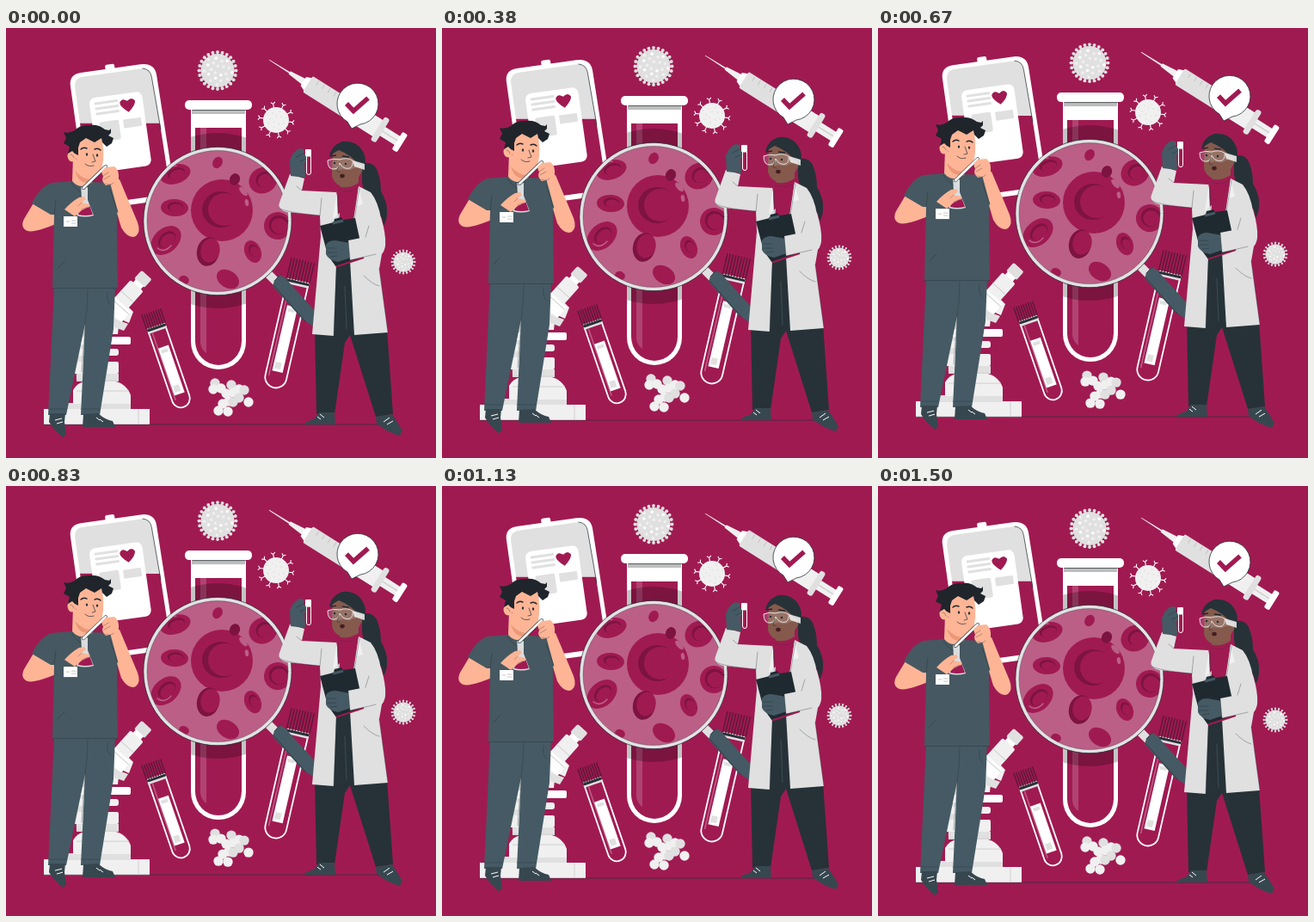
An HTML page that plays this animation: 500 px wide and 500 px high, repeating every 1.54 s.

```html
<!DOCTYPE html>
<html lang="en">
<head>
<meta charset="utf-8">
<title>Blood research</title>
<style>
  html, body { margin: 0; width: 100%; height: 100%; overflow: hidden; background: #a01a52; }
  svg { display: block; width: 100%; height: 100%; }
  .red { fill: #a01a52; }
  .deep { fill: #7c1340; }
  .pink { fill: #bb5f87; }
  .white { fill: #fff; }
  .pale { fill: #f0f0f0; }
  .grey { fill: #e0e0e0; }
  .mid { fill: #c4c4c4; }
  .ink { fill: #263238; }
  .slate { fill: #455a64; }
  .skin { fill: #fdb596; }
  .brown { fill: #855a4c; }
  .line { fill: none; stroke: #263238; stroke-width: .7; stroke-linecap: round; stroke-linejoin: round; }
  .glass { fill: none; stroke: #fff; }
</style>
</head>
<body>
<svg viewBox="0 0 500 500">
<defs>
  <clipPath id="lens"><circle cx="246" cy="224.5" r="84"/></clipPath>
  <clipPath id="shell"><path d="M215 116H279V365a32 32 0 0 1-64 0Z"/></clipPath>
</defs>
<g id="scene">
  <path class="line" d="M44 461H437"/>

  <g id="bag" transform="translate(73 54) rotate(-8)">
    <rect class="white" x="43" y="-5" width="11" height="10" rx="2"/>
    <path class="white" d="M14 0H84Q100 0 101 14L103 146Q103 160 88 160H14Q0 160 0 146V14Q0 0 14 0Z"/>
    <path class="grey" d="M16 5H82Q94 5 95 17L97 71 5 58V17Q5 5 16 5Z"/>
    <path class="red" d="M5 58 97 71 98 143Q98 154 86 154H16Q5 154 5 143Z"/>
    <path class="line" d="M86 5Q95 7 95 17L97 78"/>
    <rect class="white" x="19" y="31" width="62" height="87" rx="7"/>
    <path d="M26 38H51M26 44H51M26 50H51" stroke="#e0e0e0" stroke-width="3" stroke-linecap="round"/>
    <path class="red" d="M63 53Q54 46 54 41 57 35 63 40 69 35 72 41 72 46 63 53Z"/>
    <rect class="grey" x="27" y="60" width="23" height="23" rx="2"/>
    <rect class="grey" x="55" y="61" width="21" height="10" rx="1"/>
  </g>

  <g id="tube">
    <path class="white" d="M215 92H279V365a32 32 0 0 1-64 0Z"/>
    <path class="red" d="M220 116H274V364a27 28 0 0 1-54 0Z"/>
    <path class="pink" d="M226 116H233V378Q227 374 226 366Z" opacity=".6"/>
    <circle clip-path="url(#shell)" cx="246" cy="224" r="102" opacity=".23"/>
    <rect x="216" y="94" width="62" height="6" fill="#bdbdbd"/>
    <rect class="white" x="208" y="84" width="78" height="11" rx="5"/>
    <path class="line" d="M217 95.5H279"/>
  </g>

  <g id="syringe" transform="translate(306 37) rotate(32.2)">
    <path class="pale" d="M0-.4 30-1V1L0 .4Z"/>
    <path class="pale" d="M28-2 48-4V4L28 2Z"/>
    <path class="white" d="M47-6 54-9V9L47 6Z"/>
    <rect class="grey" x="53" y="-11" width="98" height="22" rx="2"/>
    <rect class="pale" x="104" y="-11" width="47" height="22" rx="2"/>
    <rect class="pale" x="154" y="-6" width="24" height="12"/>
    <path d="M154 0H178" stroke="#d0d0d0" stroke-width="1.5"/>
    <rect class="grey" x="149" y="-16" width="7" height="32" rx="3"/>
    <rect class="white" x="176" y="-12" width="7" height="24" rx="2"/>
    <path d="M62-10V-4M70-10V-4M78-10V-4M86-10V-4" stroke="#c4c4c4"/>
  </g>
  <path class="white" d="M397 109 402 117 412 112A24 24 0 1 0 397 109Z" stroke="#263238" stroke-width=".8"/>
  <path d="M396 88 404 96.5 421 81.5" fill="none" stroke="#a01a52" stroke-width="5.5"/>

  <g id="germs"></g>
  <g id="balls"></g>

  <g id="microscope">
    <rect class="pale" x="44" y="443" width="123" height="18"/>
    <path d="M44 460.5H167M53 443V461M154 443V461" stroke="#d0d0d0"/>
    <rect class="grey" x="62" y="436" width="83" height="7"/>
    <path class="pale" d="M78 437V421Q84 410 100 410H124Q140 413 145 427V437Z"/>
    <path class="grey" d="M80 330H118V402H131V411H82Z"/>
    <path d="M82 422H143M82 410H131" stroke="#d0d0d0"/>
    <rect class="pale" x="78" y="388" width="53" height="14" rx="2"/>
    <rect class="pale" x="78" y="373" width="53" height="8" rx="3"/>
    <rect class="white" x="76" y="359" width="69" height="9" rx="2"/>
    <path class="pale" d="M116 326 136 318 148 330 143 343 132 338 130 356H116Z"/>
    <path class="grey" d="M126 338 142 344 137 352 126 348Z"/>
    <g transform="translate(161 290) rotate(42)">
      <rect class="grey" x="-8" y="-4" width="16" height="13" rx="2"/>
      <rect class="white" x="-6" y="8" width="12" height="8"/>
      <rect class="pale" x="-10" y="13" width="20" height="29" rx="2"/>
      <rect class="white" x="-15" y="40" width="30" height="17" rx="2"/>
      <path d="M-10 30H10M-15 44H15" stroke="#d0d0d0"/>
    </g>
  </g>

  <g id="vials"></g>

  <g id="magnifier">
    <path class="grey" d="M302 290 309 283 319 293 312 300Z"/>
    <path class="slate" d="M310 300 312 294 318 287 324 290 362 332V350L345 339Z"/>
    <path class="line" d="M312 294 319 287M311 299 348 341"/>
    <circle class="pink" cx="246" cy="224.5" r="84"/>
    <g id="cells" clip-path="url(#lens)"></g>
    <circle cx="246" cy="224.5" r="84" fill="none" stroke="#e2e2e2" stroke-width="4"/>
    <circle class="line" cx="246" cy="224.5" r="86.2"/>
    <circle class="line" cx="246" cy="224.5" r="82" opacity=".5"/>
  </g>

  <g id="man">
    <path class="slate" d="M56 300H127L125 350 109 450H87L92 344 70 450H49Z"/>
    <path class="line" d="M95 304Q95 325 92 344L88 400M118 307Q116 318 122 322M50 443H70M87 443H109" opacity=".5"/>
    <path fill="#37474f" d="M51 448H69L68 458 70 473 66 476Q55 467 50 458ZM90 449 107 448Q116 456 124 457L127 464H89Z"/>
    <path d="M57 456 65 454M59 460 66 458M105 453 109 456M109 455 113 458" stroke="#fff"/>
    <path class="skin" d="M33 202 21 222Q16 232 25 236 34 239 72 222L95 211 92 195 78 203 52 214Z"/>
    <path class="skin" d="M126 205 134 232Q142 246 151 242 157 237 153 226L132 176 116 181Z"/>
    <path fill="#465861" d="M30 204Q40 184 53 180L77 178Q90 188 101 179L121 180 130 213 129 216 130 303H54L56 217 52 217Z"/>
    <path class="line" d="M54 302.5H130M56 217 58 200M121 188 130 214M76 180Q84 192 96 196M68 272Q62 276 60 280" opacity=".6"/>
    <path class="skin" d="M78 150 77 178Q86 189 100 180L104 170Z"/>
    <path d="M80 166Q90 177 101 176L95 180Q84 180 80 166Z" fill="#ec9878"/>
    <path class="skin" d="M82 128 111 126Q115 146 112 161 109 173 99 174L88 171 82 157Z"/>
    <ellipse class="skin" cx="77" cy="149" rx="5.5" ry="6.5"/>
    <path d="M75 147Q78 147 79 151" class="line" opacity=".6"/>
    <path fill="#1f252b" d="M67 121Q73 123 80 119 86 112 98 113 108 112 115 118L120 119 122 117 122 122 119 125 125 128 123 134 117 138 112 133 111 128 103 133 93 128 86 133 84 139 84 148 80 146 77 143 72 146 74 138 67 134 70 128Z"/>
    <path d="M87 141Q90 138 94 140M103 141Q107 139 110 142" fill="none" stroke="#1f252b" stroke-width="1.4" stroke-linecap="round"/>
    <ellipse class="ink" cx="94" cy="147" rx="1.2" ry="1.7"/>
    <ellipse class="ink" cx="106" cy="148" rx="1.2" ry="1.7"/>
    <path class="line" d="M101 147 104 155 100 156M92 158Q96 162 102 160"/>
    <path class="white" d="M67 219H83V231H67Z"/>
    <path d="M70 225H74M76 224H81M76 227H81" stroke="#c4c4c4"/>
    <path class="white" d="M87 185H95V200L102 218Q92 221 82 218L88 200Z" opacity=".8"/>
    <path class="red" d="M87 206H97L101 217Q92 219 84 217Z"/>
    <path class="line" d="M86 185H96M87 186V200L82 218" opacity=".4"/>
    <path class="skin" d="M68 211Q76 202 85 197L91 196 93 199 88 203 97 205Q99 208 94 209L88 212 80 219Z"/>
    <path class="line" d="M88 203 84 207M95 208 88 211" opacity=".4"/>
    <path d="M90 186 116 161" stroke="#263238" stroke-width="4" stroke-linecap="round"/>
    <path d="M90 186 116 161" stroke="#f4f4f4" stroke-width="2.9" stroke-linecap="round"/>
    <path class="skin" d="M111 167 116 162 126 161Q132 165 131 176L133 180 116 183Q110 177 113 173Z"/>
    <path class="line" d="M113 172 119 168M114 176 121 172M116 181Q121 184 125 180" opacity=".5"/>
  </g>

  <g id="woman">
    <path class="ink" d="M414 158Q425 154 431 164 436 176 436 190 444 203 443 215 443 224 439 230 438 218 430 211 416 199 414 178Z"/>
    <path class="ink" d="M359 350 382 270H404L443 350 450 449 430 452 400 357 394 366 382 449H361Z"/>
    <path class="line" d="M394 300 396 350" style="stroke:#455a64"/>
    <path fill="#37474f" d="M364 447H382L383 461H347Q348 457 358 455ZM430 452 449 449 461 468 458 474Q443 470 431 460Z"/>
    <path d="M362 452 366 455M365 449 370 453M439 458 446 453M443 461 450 457" stroke="#fff"/>
    <path class="red" d="M382 188 409 186 404 232 385 235Z"/>
    <path class="brown" d="M388 173 410 166 410 188 388 189Z"/>
    <path class="red" d="M386 184Q398 188 410 180L413 193Q400 201 386 195Z"/>
    <path class="line" d="M387 188Q399 193 410 185" opacity=".35"/>
    <path class="grey" d="M330 170 347 175 344 189 384 191 386 220 381 358 356 356 366 242 365 218 327 214Q315 211 318 203Z"/>
    <path class="grey" d="M410 184 424 191Q433 202 436 222L441 247Q442 257 437 263L434 280 444 354 405 357 400 270 403 230Z"/>
    <path class="pale" d="M385 190 380 222 388 215 386 245ZM410 185 415 205 408 207 403 239Z"/>
    <path class="line" d="M386 192 387 220 381 358M411 186 403 236M365 218 367 198M344 189 338 184M434 280 444 354M427 214 431 240M416 288Q426 298 434 300M318 209Q321 214 365 218" opacity=".5"/>
    <path fill="#1f2a30" d="M365 230 381 226 382 222 390 220 392 223 406 221 416 267 384 278 374 264Z"/>
    <path d="M384 277.5 416 267" stroke="#a01a52" stroke-width="2"/>
    <path d="M380 227 392 224" stroke="#455a64" stroke-width="3"/>
    <path class="slate" d="M372 252Q375 247 383 247L400 250 401 267 386 272Q375 270 372 263Z"/>
    <path class="line" d="M373 256H384M374 261H384M377 266 385 265" opacity=".7"/>
    <path class="grey" d="M398 247 418 243 424 210 436 220Q442 240 441 252 439 262 430 263L400 270Z"/>
    <path class="line" d="M398 248 400 270M418 243 422 230M400 270 430 263" opacity=".5"/>
    <path class="slate" d="M331 172 330 154Q333 144 341 140L347 141 346 146 351 148 351 153 347 157 348 174Z"/>
    <path class="line" d="M346 146 338 150M349 152 342 155" opacity=".7"/>
    <path class="red" d="M349.5 149H354.5V168a2.5 2.5 0 0 1-5 0Z" stroke="#fff"/>
    <rect class="white" x="348" y="141" width="7" height="8" rx="1"/>
    <path class="brown" d="M380 142Q396 134 411 151L412 170Q406 182 396 185 382 184 379 172Z"/>
    <path class="ink" d="M376 151Q377 137 391 132 406 130 414 142 420 151 417 163L413 167 409 158Q402 148 387 142 380 145 376 151Z"/>
    <ellipse class="brown" cx="411" cy="164" rx="3.5" ry="5.5"/>
    <path d="M374 153 388 151 402 153 414 157 417 161 404 163Q401 167 391 164 383 167 376 163Z" fill="#fff" opacity=".15"/>
    <path d="M374 154Q380 151 388 153 396 150 403 154M374 154Q374 165 382 164 387 163 388 157 392 165 400 163 404 160 403 154" fill="none" stroke="#eee" stroke-width=".9"/>
    <path d="M403 154 417 158V165L405 161Z" fill="#f2f2f2" opacity=".85"/>
    <path d="M378 149 384 148M391 149 399 150" stroke="#1f252b" stroke-width="1.3"/>
    <circle class="ink" cx="382" cy="157" r="1.3"/>
    <circle class="ink" cx="395" cy="158" r="1.3"/>
    <path class="line" d="M387 159 385 167 389 168" opacity=".7"/>
    <ellipse cx="391" cy="172" rx="2.8" ry="2.3" fill="#421f22"/>
  </g>
</g>
</svg>
<script>
const $ = id => document.getElementById(id);
const NS = 'http://www.w3.org/2000/svg';

function add(parent, tag, attrs) {
  const el = document.createElementNS(NS, tag);
  for (const k in attrs) el.setAttribute(k, attrs[k]);
  return parent.appendChild(el);
}
const group = (id, transform) => add($(id), 'g', { transform });
const path = (g, d, attrs) => add(g, 'path', { d, ...attrs });
const oval = (g, cx, cy, rx, ry, turn, cls) =>
  add(g, 'ellipse', { cx, cy, rx, ry, class: cls, transform: `rotate(${turn} ${cx} ${cy})` });

// Spots spread evenly over a disc
function spots(g, count, reach, r, pick) {
  for (let i = 1; i < count; i++) {
    const a = i * 2.4, d = reach * Math.sqrt(i / count);
    add(g, 'circle', { cx: d * Math.cos(a), cy: d * Math.sin(a), r, class: pick(i) });
  }
}

// Round germ with knobs on its rim
function knobby(x, y, r, reach, knobs) {
  const g = group('germs', `translate(${x} ${y})`);
  for (let i = 0; i < knobs; i++) {
    const a = i / knobs * Math.PI * 2, kx = reach * Math.cos(a), ky = reach * Math.sin(a);
    add(g, 'circle', { cx: kx, cy: ky, r: r * .1, class: 'grey' });
    path(g, `M0 0L${kx} ${ky}`, { stroke: '#e0e0e0', 'stroke-width': r * .11 });
  }
  add(g, 'circle', { r, class: 'grey' });
  spots(g, 22, r * .9, r * .09, i => i % 3 ? 'pale' : 'white');
}

// Germ with forked spikes
function spiky(x, y, r, spikes) {
  const g = group('germs', `translate(${x} ${y})`);
  for (let i = 0; i < spikes; i++)
    path(g, `M0 0H${r + 4}l2-2.5M${r + 4} 0l2 2.5`, {
      class: 'glass', 'stroke-width': 1.1, transform: `rotate(${i * 360 / spikes + 8})`
    });
  add(g, 'circle', { r, class: 'pale' });
  spots(g, 14, r * .85, .9, () => 'grey');
}

// Capped sample vial; w and h are the glass size
function vial(x, y, turn, w, h, cap, label, labelH) {
  const g = group('vials', `translate(${x} ${y}) rotate(${turn})`), r = w / 2, c = r + 2;
  path(g, `M${-r} ${cap}V${h - r}a${r} ${r} 0 0 0 ${w} 0V${cap}Z`, { class: 'glass', 'stroke-width': 1.8 });
  path(g, `M${4 - r} ${cap + 6}V${h - r}`, { stroke: '#bb5f87', 'stroke-width': 1.5 });
  for (let i = 0; i < 9; i++) {
    const lx = -c + 1 + i * (c * 2 - 2) / 8;
    path(g, `M${lx} -1V${cap}`, { stroke: '#5c1838', 'stroke-width': 1.4 });
  }
  add(g, 'rect', { x: -r - 1, y: cap, width: w + 2, height: 3, class: 'ink' });
  add(g, 'rect', { x: -r - 1, y: cap + 3, width: w + 2, height: 2.5, class: 'grey' });
  add(g, 'rect', { x: -6, y: label, width: 12.5, height: labelH, class: 'white' });
  add(g, 'rect', { x: -4, y: label + labelH - 11, width: 7, height: 8, class: 'grey' });
  add(g, 'rect', { x: -4, y: label + 3, width: 8, height: 4, class: 'grey' });
}

// Blood cell with a dimple
function cell(x, y, rx, ry, turn, dimple = .58) {
  const g = $('cells');
  oval(g, x, y, rx, ry, turn, 'red');
  if (!dimple) return;
  oval(g, x + 1, y - 1, rx * dimple, ry * dimple, turn, 'deep');
  oval(g, x + 2, y + .3, rx * dimple * .86, ry * dimple * .82, turn, 'red');
}

knobby(246, 49.5, 19.5, 21.5, 24);
knobby(462, 272, 11.5, 13.4, 20);
spiky(314, 107, 15, 10);

[[243,413],[250,419],[241,420],[262,415],[271,420],[256,425],[277,421],[264,424],
 [282,435],[271,430],[259,434],[252,437],[264,435],[247,445],[258,446]].forEach(([cx, cy], i) =>
  add($('balls'), 'circle', { cx, cy, r: 5.7, class: i % 3 ? 'pale' : 'grey' }));

vial(169, 331, -19, 21, 116, 17, 42, 58);
vial(345, 271, 13, 25, 151, 24, 54, 78);

cell(197, 170, 18, 11, -18);
cell(196, 209, 16, 10, 3);
cell(186, 247, 20, 14, -42);
cell(299, 177, 17, 15, -30);
cell(316, 230, 16, 16, 20, .7);
cell(287, 260, 9.5, 13.5, -22);
cell(258, 292, 14, 10, 32, 0);
cell(207, 293, 6, 5, 20, 0);
cell(246, 156.5, 5.5, 7, 30, 0);
cell(251, 212, 36, 36, 0, 0);
const cells = $('cells');
oval(cells, 250, 211, 22, 21, 0, 'deep');
oval(cells, 254, 211, 19, 19, 0, 'red');
oval(cells, 276, 190, 6.5, 3, 48, 'pink');
oval(cells, 280, 203, 2.2, 4, -8, 'pink');
oval(cells, 266, 176, 6, 7, 20, 'deep');
oval(cells, 235, 260, 13, 17, 12, 'deep');
oval(cells, 237.5, 258.5, 11, 14, 12, 'red');
path(cells, 'M186 164Q192 160 198 160M176 256Q184 262 192 253', {
  fill: 'none', stroke: '#c0648c', 'stroke-width': 1.4, 'stroke-linecap': 'round'
});

// Everything floats 10 px up and back at 24 steps a second, then rests for one step
const LOOP = 1540, STEP = 1000 / 24, STEPS = 36;
const scene = $('scene');
const start = performance.now();

function draw(now) {
  const t = Math.max(0, now - start) % LOOP;
  const p = Math.min(STEPS, Math.floor((t + 4) / STEP)) / STEPS;
  const y = -10 * (1 - Math.abs(1 - 2 * p));
  scene.setAttribute('transform', `translate(0 ${y.toFixed(3)})`);
  requestAnimationFrame(draw);
}
draw(start);
</script>
</body>
</html>
```
